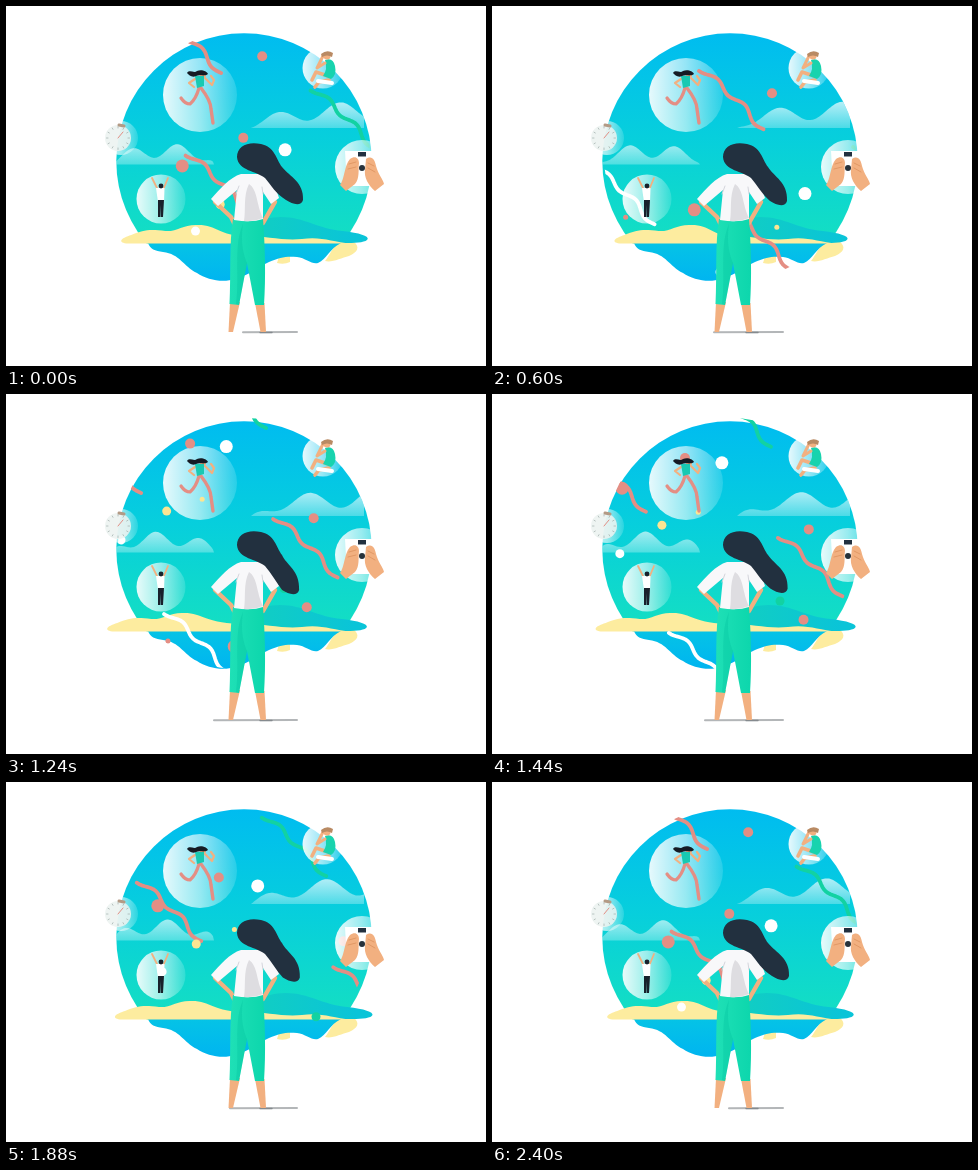
Recreate the animation shown at these times as an HTML page with a canvas. Size 480 by 360 pixels, loop 2.44 s.

```html
<!DOCTYPE html>
<html lang="en">
<head>
<meta charset="utf-8">
<title>Beach daydream</title>
<style>
html, body { margin: 0; width: 100%; height: 100%; overflow: hidden; background: #fff; }
canvas { display: block; width: 480px; height: 360px; }
</style>
</head>
<body>
<canvas id="stage" width="480" height="360"></canvas>
<script>
const c = document.getElementById('stage').getContext('2d');
// the motion repeats every PLAY ms; its last pose is held until LOOP
const LOOP = 2440, PLAY = 2400, STEP = 40, SPEED = 0.094, TAU = Math.PI * 2;
const SKIN = '#f2b080', NAVY = '#22303f', SALMON = '#e48e84', SAND = '#fdec9f',
      YELLOW = '#fce592', GREEN = '#12d2a2', WHITE = '#fff';

// radius, colour, [time, x, y] at both ends of the fall, sideways bow
const dots = [
  [6.5, WHITE, [940, 206, 28], [3560, 346, 227], -5],
  [6.5, SALMON, [1240, 120, 81], [3660, 229, 254], 4],
  [5, SALMON, [2000, 241, 25], [4500, 348, 171], -4],
  [5, SALMON, [1080, 177, 38], [4180, 330, 247], -5],
  [4.5, YELLOW, [640, 133, 75], [2720, 229, 221], 0],
  [4.5, WHITE, [1240, 115, 146], [3000, 228, 266], 0],
  [4.5, GREEN, [2600, 226, 129], [4300, 311, 236], 0],
  [2.5, SALMON, [200, 116, 189], [1400, 169, 256], 0],
  [2.5, YELLOW, [920, 180, 84], [3480, 309, 253], 0]
];

// colour, then time, x, y of the tail
const ribbons = [
  [SALMON, 920, 237, 95], [GREEN, 2160, 282, 62], [SALMON, 2160, 157, 127], [WHITE, 920, 128, 190]
];

const saw = (t, start, period) => ((t - start) % period + period) % period / period;
const wave = (t, peak, period) => Math.cos(TAU * (t - peak) / period);

function fill(d, colour) {
  c.fillStyle = colour;
  c.fill(new Path2D(d));
}

function line(d, colour, width) {
  c.strokeStyle = colour;
  c.lineWidth = width;
  c.lineCap = c.lineJoin = 'round';
  c.stroke(new Path2D(d));
}

function disc(x, y, r, colour) {
  c.fillStyle = colour;
  c.beginPath();
  c.arc(x, y, r, 0, TAU);
  c.fill();
}

function blend(x0, y0, x1, y1, ...stops) {
  const g = c.createLinearGradient(x0, y0, x1, y1);
  stops.forEach((s, i) => g.addColorStop(i / (stops.length - 1), s));
  return g;
}

function bubble(x, y, r) {
  disc(x, y, r, blend(x - r, y, x + r, y, 'rgba(255,255,255,.9)', 'rgba(255,255,255,.58)', 'rgba(255,255,255,.14)'));
}

// a train of humps scrolls to the right under a fixed outline
function cloud(t, base, from, to, first, gap, outline) {
  const crest = first + gap * t / PLAY;
  c.beginPath();
  c.moveTo(from, base);
  for (let x = from; x <= to; x++) {
    c.lineTo(x, base - outline(x) * (0.66 + 0.34 * wave(x, crest, gap)));
  }
  c.lineTo(to, base);
  c.fillStyle = blend(0, base - 26, 0, base, 'rgba(255,255,255,.7)', 'rgba(255,255,255,.28)');
  c.fill();
}

function sky(t) {
  c.save();
  c.beginPath();
  c.rect(0, 0, 480, 237.5);
  c.clip();
  disc(238, 155, 127.7, blend(0, 27, 0, 237, '#00bcf0', '#07cfdc', '#14dfc2'));
  c.beginPath();
  c.arc(238, 155, 127.7, 0, TAU);
  c.clip();
  cloud(t, 122, 245, 358, 269, 65, x => 27 * (1 - Math.exp((245 - x) / 30)));
  cloud(t, 158.5, 108, 208, 125, 47, x => 21 * Math.sqrt(1 - ((x - 158) / 50) ** 2));
  c.restore();
}

function shore(t) {
  const l = 94 + 29 * saw(t, 640, PLAY), r = 361 + 5.5 * wave(t, 1850, PLAY);
  fill('M319 255C324 249 327 240 333 236L348 236C354 241 352 246 343 250C335 252 326 257 319 255Z' +
    'M271 257L274 247L284 249L284 256Q278 259 271 257Z', SAND);
  fill('M142 237C144 243 149 245 157 246C174 248 177 260 191 267C201 274 217 277 229 273' +
    'C246 268 250 262 263 256C274 251 281 250 291 251C300 252 306 259 312 257C321 253 323 243 335 237Z',
    blend(0, 237, 0, 275, '#05c3e6', '#00b5f0'));
  fill(`M225 237C239 222 ${r - 108} 211 ${r - 87} 211C${r - 63} 211 ${r - 50} 223 ${r - 25} 225` +
    `C${r - 8} 227 ${r + 1} 230 ${r} 233C${r - 1} 236 ${r - 10} 237 ${r - 20} 237Z`,
    blend(235, 0, 350, 0, '#12cfc0', '#0ac4d8'));
  fill(`M${l + 5} 237.5C${l - 4} 236 ${l} 232 ${l + 10} 229C${l + 22} 224 ${l + 28} 223 ${l + 44} 225` +
    `C${l + 56} 226 ${l + 62} 218 ${l + 77} 219C${l + 96} 219 ${l + 98} 230 240 230` +
    'C260 230 277 235 296 233C315 230 326 236 345 237.5Z', SAND);
}

function runner() {
  line('M193 82Q190 93 184 98Q179 98 175 92', SALMON, 3.2);
  line('M195 82Q205 95 205 103L207 117', SALMON, 3.4);
  line('M189 73L183 77L188 81M199 72L206 79L208 74L205 70', SKIN, 2.2);
  disc(197, 69, 3, SKIN);
  fill('M189 70L198 70L198 80L191 82Z', '#18c9b2');
  fill('M181 67C184 63 188 68 191 65C195 63 201 65 202 68C198 71 194 68 190 70C186 72 183 69 181 67Z', '#151b24');
}

function jumper() {
  line('M146 172L152 184M162 172L157 184', SKIN, 1.8);
  fill('M150 182L158.5 182L158 196L152 196Z', WHITE);
  fill('M152 194H158L157 211H155L155 199L154.5 211H152Z', '#18212b');
  disc(155, 180, 2.4, '#18212b');
}

function photographer() {
  bubble(317, 62, 20.5);
  line('M322 70L310 66L306 74M323 74L313 76L309 81', SKIN, 3.6);
  line('M312 75L326 77', WHITE, 4);
  fill('M319 54Q327 51 329 60Q331 69 325 73L317 70Q322 63 319 54Z', '#18d3ae');
  line('M319 57L311 62L317 50', SKIN, 3);
  disc(321, 50, 3.5, SKIN);
  fill('M315 48Q321 43 327 47L326 51Q321 48 316 51Z', '#b98a63');
}

function stopwatch() {
  bubble(115, 132, 17);
  disc(112, 132, 13, 'rgba(236,242,240,.88)');
  for (let a = 0; a < TAU; a += TAU / 12) {
    const x = Math.cos(a), y = Math.sin(a);
    line(`M${112 + 10 * x} ${132 + 10 * y}L${112 + 11.5 * x} ${132 + 11.5 * y}`, '#a9b5b3', 0.8);
  }
  line('M112 132L117 126', SALMON, 1);
  line('M113 119L118 120', '#b39a85', 3);
}

function camera() {
  bubble(356, 161, 27);
  fill('M339 145H367V180H341Z', WHITE);
  fill('M352 146H360V150.5H352Z', NAVY);
  fill('M344 153C349 149 353 152 353 157C352 164 354 172 349 178L340 185L334 179C339 172 338 160 344 153Z', SKIN);
  fill('M360 153C366 149 369 154 370 160C372 168 377 173 378 178L369 185C362 179 358 171 359 164Z', SKIN);
  line('M343 158L350 156M342 163L350 161M362 157L368 160M362 162L369 166', '#dc925f', 0.8);
  disc(356, 162, 3, '#27323b');
}

function ribbon(x, y, colour) {
  let d = '';
  for (let s = 0; s <= 1; s += 1 / 32) {
    const bend = 2 * (1 - Math.cos(4.6 * Math.PI * s)) + 2 * Math.sin(Math.PI * s);
    d += `${s ? 'L' : 'M'}${x + 62 * s + bend} ${y + 61 * s - bend}`;
  }
  line(d, colour, 3.8);
}

function confetti(t) {
  c.save();
  c.beginPath();
  c.arc(238, 150, 126, 0, TAU);
  c.clip();
  for (const now of [t - PLAY, t, t + PLAY]) {
    for (const [colour, at, x, y] of ribbons) {
      const go = (now - at) * SPEED;
      ribbon(x + go, y + go, colour);
    }
    for (const [r, colour, [t0, x0, y0], [t1, x1, y1], bow] of dots) {
      const p = (now - t0) / (t1 - t0), side = bow * Math.sin(Math.PI * p);
      if (p >= 0 && p <= 1) disc(x0 + (x1 - x0) * p + side, y0 + (y1 - y0) * p - side, r, colour);
    }
  }
  c.restore();
}

function woman(t) {
  const from = 208 + 30 * saw(t, 40, PLAY / 2), sway = 2 * wave(t, 0, PLAY / 3) - 2;
  line(`M${from} 326.2L291 326`, '#b3b6b8', 2);
  line('M254 326.5L266 326.5', '#858a8e', 1.4);

  fill('M224 296H234L227 326H222.5Z', SKIN);
  fill('M249 297H258.5L260 326H254.5Z', SKIN);
  line('M209 196L225 211L228 217', SKIN, 4.4);
  line('M269 196L257 217', SKIN, 4.4);
  fill('M227 213H257C259 240 260 270 258 299L249 299L241 257L233 299L223.5 298C225 270 223 237 227 213Z',
    blend(224, 0, 260, 0, '#1fe0b6', '#0cd6ac'));
  fill('M237 218C234 238 238 250 241 257L233 299L230 298C234 270 227 240 237 218Z', 'rgba(0,190,155,.3)');
  fill('M235 168C224 171 213 184 205 193L212 200L231 184L228 214Q246 217 257 213L257 186L265 198L273 192' +
    'C270 182 266 171 258 168Z', '#f8f8fa');
  fill('M243 178C252 184 250 198 257 212Q248 216 238 215C240 204 237 190 243 178Z', '#dedde1');
  line('M230 188L233 180M257 188L256 181', '#d4d5dc', 1);

  const x = 297 + sway, y = 194 - sway * 0.5;
  fill(`M231 151C231 140 242 135 255 138C269 141 270 153 276 161C${284 + sway} 171 ${x + 1} 176 ${x} ${y}` +
    `C${x - 2} ${y + 7} ${x - 11} ${y + 4} ${x - 17} ${y}C270 188 265 179 259 172C251 165 232 165 231 151Z`, NAVY);
}

function draw(t) {
  c.fillStyle = WHITE;
  c.fillRect(0, 0, 480, 360);
  sky(t);
  shore(t);
  bubble(194, 89, 37);
  bubble(155, 193, 24.5);
  confetti(t);
  runner();
  jumper();
  photographer();
  stopwatch();
  camera();
  woman(t);
}

const start = performance.now();
function tick() {
  const t = (performance.now() - start) % LOOP;
  draw(Math.min(PLAY, Math.floor(t / STEP) * STEP) % PLAY);
  requestAnimationFrame(tick);
}
tick();
</script>
</body>
</html>
```
